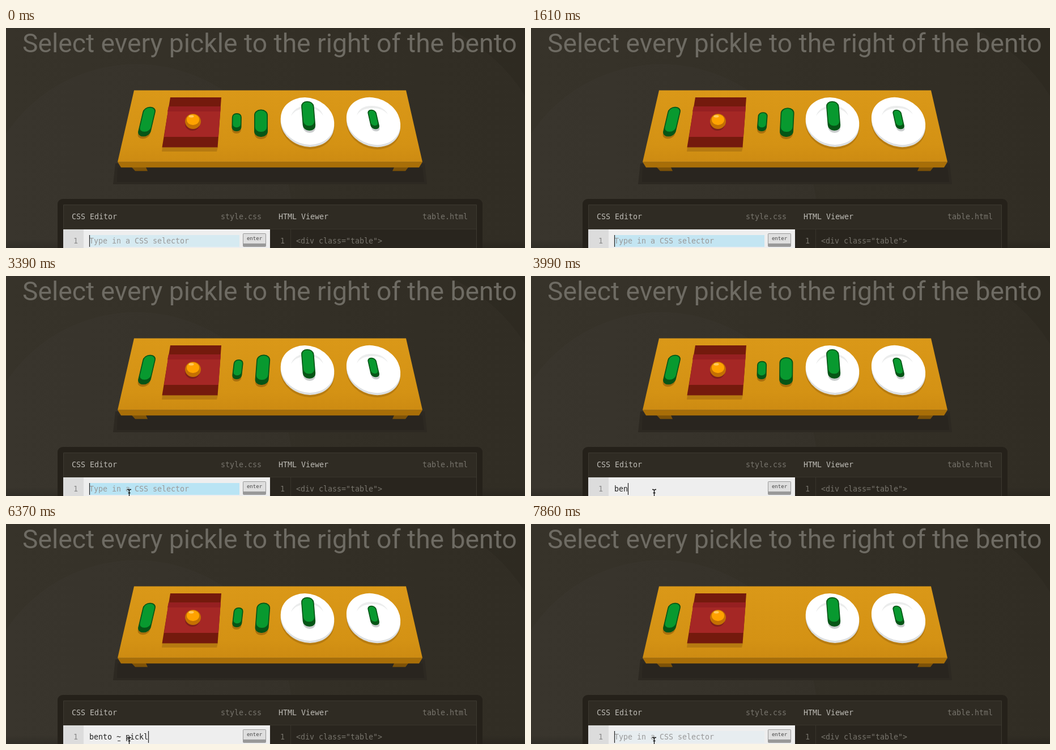
An HTML page for the animation above (8000 ms loop, 916x390 px).

```html
<!DOCTYPE html>
<html lang="en">
<head>
<meta charset="utf-8">
<title>Selector game</title>
<style>
  html, body { margin: 0; width: 100%; height: 100%; overflow: hidden; background: #322e26; }
  svg { display: block; width: 916px; height: 390px; }
  text { font: 13.3px "DejaVu Sans Mono", monospace; white-space: pre; }
  .title { font: 46.25px Roboto, sans-serif; fill: #6e6b63; }
  .head { fill: #bdbbb5; }
  .dim { fill: #77746c; }
  .enter { font-size: 9px; fill: #444; text-anchor: middle; }
</style>
</head>
<body>
<svg viewBox="0 0 916 390">
  <defs>
    <linearGradient id="bg">
      <stop stop-color="#37332a"/><stop offset=".6" stop-color="#332f26"/><stop offset="1" stop-color="#312d24"/>
    </linearGradient>
    <linearGradient id="wood" x2="0" y2="1">
      <stop stop-color="#da9818"/><stop offset=".75" stop-color="#d49214"/><stop offset="1" stop-color="#cd8b12"/>
    </linearGradient>
    <linearGradient id="fade" x2="0" y2="1">
      <stop stop-opacity="0"/><stop offset="1" stop-opacity=".14"/>
    </linearGradient>
  </defs>
  <rect width="916" height="390" fill="url(#bg)"/>
  <path d="M780 0Q870 45 916 120V0Z" opacity=".07"/>
  <circle cx="230" cy="340" r="276" fill="#fff" opacity=".01"/>
  <rect y="374" width="916" height="16" fill="url(#fade)"/>
  <text class="title" x="29" y="43">Select every pickle to the right of the bento</text>

  <!-- table -->
  <path d="M193 240H739L743 277H189Z" fill="#2d2922"/>
  <path d="M197 247H735L738 273H196Z" fill="#29251f"/>
  <path d="M222 247H247L250 253.500H228ZM685 247H710L705 253.500H682Z" fill="#7d5208"/>
  <path d="M197 237.500H735L729 247.300H203Z" fill="#a86e08"/>
  <path d="M226 110.500H706L735 237.500H197Z" fill="url(#wood)"/>

  <!-- bento -->
  <path d="M276 211H374L372 219H275Z" fill="#b67a11"/>
  <path d="M290 123H380L373.500 211.500H275.500Z" fill="#741a0d"/>
  <path d="M287 139H379L375 193H279Z" fill="#a52725"/>
  <path d="M287 139H379L378 148H285Z" fill="#962021"/>
  <ellipse cx="329" cy="170" rx="13" ry="12" fill="#82201b"/>
  <ellipse cx="330" cy="165.500" rx="14" ry="13.500" fill="#c47003"/>
  <ellipse cx="330" cy="162.500" rx="11" ry="9.500" fill="#ffa200"/>
  <ellipse cx="327" cy="156.500" rx="4.500" ry="2.200" fill="#ffc95c"/>

  <g id="food"></g>

  <!-- panel -->
  <rect x="91" y="303" width="750" height="100" rx="9" fill="#25211a"/>
  <path d="M101.500 390V313.500H830.500V390" fill="#2f2b23" stroke="#3d3a31"/>
  <path d="M466 357H830V390H466Z" fill="#29251e"/>
  <path d="M101 356.500H830M502.500 357V390" stroke="#38342b"/>
  <text class="head" x="116" y="339">CSS Editor</text>
  <text class="dim" x="379" y="339">style.css</text>
  <text class="head" x="481" y="339">HTML Viewer</text>
  <text class="dim" x="735" y="339">table.html</text>
  <text class="dim" x="484" y="382">1</text>
  <text class="dim" x="512" y="382">&lt;div class="table"&gt;</text>
  <path d="M101 357H466V390H101Z" fill="#eee"/>
  <path d="M101 357H137V390H101Z" fill="#dcdcdc"/>
  <text x="119" y="382" fill="#888">1</text>
  <rect id="glow" x="147" y="367" width="265" height="21" fill="#b9e4f4"/>
  <text id="field" x="147" y="382"></text>
  <path id="tick" d="M197 384.500H202" stroke="#333"/>
  <path id="caret" d="M0 367V388" stroke="#222" stroke-width="1.200"/>
  <rect x="418.500" y="364.500" width="40" height="23" rx="1" fill="#999" stroke="#999"/>
  <path d="M419 365H458V382H419Z" fill="#dedede"/>
  <text class="enter" x="438.500" y="376">enter</text>
  <path id="mouse" d="M214 378.500H216L217.500 380L219 378.500H221M217.500 380V390M215.500 384.500H219.500" fill="none" stroke="#111" stroke-width="1.300"/>
</svg>
<script>
const LOOP = 8000, STEP = 148.3, PULSE = 980, BLINK = 1400;
const START = 3690, SUBMIT = 6960;
const WORD = "bento ~ pickle";
const KEY_TIMES = [3690, 3840, 3990, 4140, 4290, 4580, 4730, 5330, 5780, 5930, 6070, 6220, 6360, 6520];

const $ = id => document.getElementById(id);
const food = $("food");
const clamp = v => Math.max(0, Math.min(1, v));
const mix = (a, b, k) => a + (b - a) * k;

function set(node, attrs) {
  for (const name in attrs) node.setAttribute(name, attrs[name]);
  return node;
}

function add(parent, tag, attrs) {
  const node = document.createElementNS("http://www.w3.org/2000/svg", tag);
  parent.append(node);
  return set(node, attrs);
}

function plate(x, rx, ry, angle, arc) {
  const disc = (dy, fill) => add(food, "ellipse", {
    cx: x, cy: 165 + dy, rx, ry, fill, transform: `rotate(${angle} ${x} ${165 + dy})`
  });
  disc(8, "#b87c10");
  disc(4, "#dcdfe1");
  disc(0, "#fff");
  add(food, "path", { d: arc, fill: "#ebecec" });
}

// Rounded bars sheared along the axis (x1,y1)-(x2,y2): shadow, dark skin, bright top.
function makePickle(width, shadow) {
  const node = add(food, "g");
  const bars = [shadow, "#065516", "#08992f"].map(fill => add(node, "rect", { fill }));
  const rim = 1.7, cut = width * .3;

  function bar(rect, top, bottom, w) {
    set(rect, { x: -w / 2, y: top, width: w, height: bottom - top, rx: w * .46, ry: w * .42 });
  }
  return {
    node,
    pose(x1, y1, x2, y2) {
      const slope = (x2 - x1) / (y2 - y1);
      const top = -width / 2, bottom = y2 - y1 + width / 2;
      set(node, { transform: `matrix(1 0 ${slope} 1 ${x1} ${y1})` });
      bar(bars[0], top + 4, bottom + 4, width - 1);
      bar(bars[1], top, bottom, width);
      bar(bars[2], top + rim, bottom - rim - cut, width - 2 * rim);
    }
  };
}

const WOOD = "#a9700d", GRAY = "#c9cccd";
plate(532, 48, 41, 20, "M503 156Q509 138 532 138T560 156Q552 142 532 142T503 156Z");
plate(648.5, 49, 40.5, 25, "M619 155Q624 138 645 138T674 153Q664 141 645 142T619 155Z");
makePickle(22.5, WOOD).pose(252, 151, 245, 181);
makePickle(22.5, GRAY).pose(532.5, 141, 534.8, 170.5);
makePickle(15.5, GRAY).pose(646.5, 152.5, 650.8, 171.5);

const swayers = [
  { pickle: makePickle(17, WOOD), rest: [407.3, 159.5, 407, 174.5], lean: [410, 156.5, 408, 174.5] },
  { pickle: makePickle(24, WOOD), rest: [450, 156.5, 450, 181], lean: [454, 151.5, 451.8, 181] }
];

function sway(phase) {
  const k = .5 + .5 * Math.cos(2 * Math.PI * (phase - .44));
  return k * k * (3 - 2 * k);
}

// Piecewise linear brightness of the input highlight.
const GLOW = [[0, .45], [.025, .08], [.05, .06], [.38, 1], [.47, 1], [1, .45]];
function glow(phase) {
  const i = GLOW.findIndex(p => phase < p[0]);
  const [a, b] = [GLOW[i - 1], GLOW[i]];
  return mix(a[1], b[1], (phase - a[0]) / (b[0] - a[0]));
}

const show = (node, on) => set(node, { visibility: on ? "visible" : "hidden" });

function draw(now) {
  const time = now % LOOP;
  const t = Math.floor(time / STEP + .25) * STEP;
  const phase = t / PULSE % 1;

  const k = sway(phase);
  for (const { pickle, rest, lean } of swayers) {
    pickle.pose(...rest.map((v, i) => mix(v, lean[i], k)));
    set(pickle.node, { opacity: 1 - clamp((t - SUBMIT + 100) / 450) });
  }

  const typing = time >= START && time < SUBMIT;
  const count = typing ? KEY_TIMES.filter(at => at <= time).length : 0;
  $("field").textContent = typing ? WORD.slice(0, count) : "Type in a CSS selector";
  set($("field"), { fill: typing ? "#222" : "#999" });
  set($("glow"), { opacity: typing ? 0 : glow(phase) });
  set($("caret"), { transform: `translate(${147.5 + count * 8})` });
  show($("caret"), time >= START || time % BLINK < BLINK / 2);
  show($("tick"), count > 6);
  show($("mouse"), time >= 1620);
}

let begin;
function tick(now) {
  begin ??= now;
  draw(now - begin);
  requestAnimationFrame(tick);
}
draw(0);
requestAnimationFrame(tick);
</script>
</body>
</html>
```
